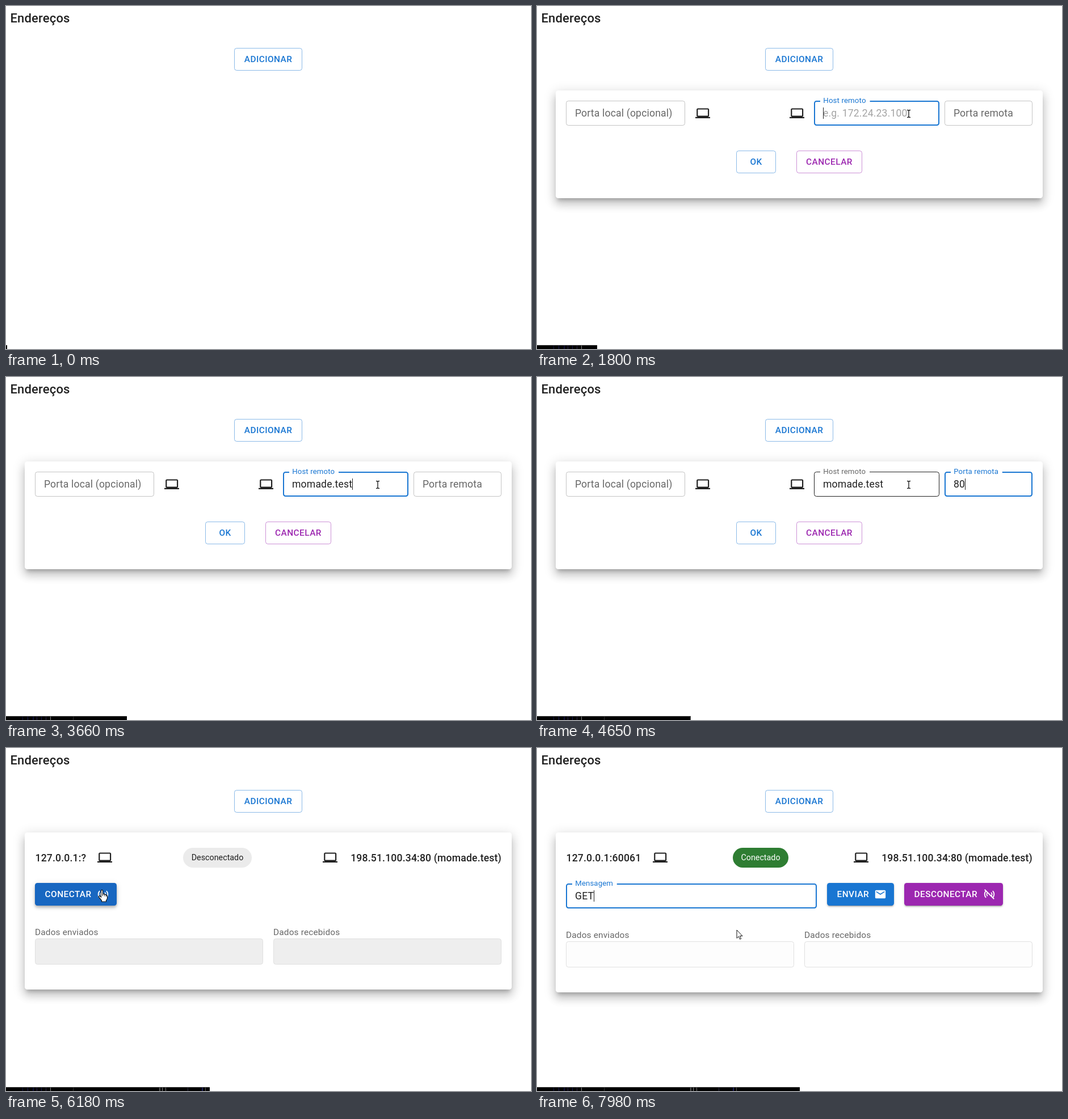
An HTML page that plays this animation: 925 px wide and 605 px high, repeating every 8000 ms.

```html
<!DOCTYPE html>
<html lang="pt">
<head>
<meta charset="utf-8">
<style>
html, body { margin: 0; width: 100%; height: 100%; overflow: hidden; background: #fff; }
#stage { position: relative; width: 925px; height: 605px; overflow: hidden; font-family: Roboto, sans-serif; color: rgba(0,0,0,.87); }
#stage div, #stage svg { position: absolute; box-sizing: border-box; }
.text { white-space: pre; line-height: 24px; font-size: 17.6px; letter-spacing: .00938em; }
.button { border-radius: 4.4px; font: 500 15.4px/40px Roboto, sans-serif; letter-spacing: .02857em; overflow: hidden; white-space: pre; }
.outlined { text-align: center; line-height: 38px; border: 1px solid; }
.label { white-space: pre; background: #fff; padding: 0 9px 0 7px; font-size: 17.6px; line-height: 25.3px; letter-spacing: .00938em; transform-origin: 0 0; }
.caret { display: inline-block; width: 1px; height: 20px; margin-right: -1px; vertical-align: -4px; background: #222; }
</style>
</head>
<body>
<div id="stage"></div>
<script>
const LOOP = 8000, STEP = 30;
const BLUE = '25,118,210', PURPLE = '156,39,176';
const HOST = 'momade.test';

// Moments of the story, in ms
const CLICK_ADD = 270, SHOW_FORM = 330, LEAVE_ADD = 1120, ENTER_CARD = 1245;
const FOCUS_HOST = 1640, FOCUS_PORT = 3900, SUBMIT = 4700;
const CLICK_CONNECT = 5680, CONNECTED = 6450, FOCUS_MESSAGE = 7260, TYPE_MESSAGE = 7500;

const POINTER_PATH = [
  [30, 560, 640], [210, 483, 96], [1000, 483, 96], [1450, 655, 190], [4950, 655, 190],
  [5550, 169, 250], [6470, 169, 250], [6850, 239, 290], [7050, 239, 290],
  [7200, 262, 262], [7350, 262, 262], [7800, 352, 321]
];

const ADD = [402, 74, 120, 40], CONNECT = [51, 238, 144, 40];
const LOCAL_FIELD = [51, 167, 210, 44], HOST_FIELD = [488, 167, 221, 44];
const PORT_FIELD = [718, 167, 155, 44], MESSAGE_FIELD = [51, 239, 442, 44];

const ARCS = '<path fill="none" stroke="#fff" stroke-width="2" d="M5.6 5.6a9 9 0 0 0 0 12.8M18.4 5.6a9 9 0 0 1 0 12.8M8.5 8.5a5 5 0 0 0 0 7M15.5 8.5a5 5 0 0 1 0 7"/>';
const ICONS = {
  laptop: '<path d="M20 18c1.1 0 2-.9 2-2V6c0-1.1-.9-2-2-2H4c-1.1 0-2 .9-2 2v10c0 1.1.9 2 2 2H0v2h24v-2zM4 6h16v10H4z" fill="#212121" fill-rule="evenodd"/>',
  mail: '<path d="M20 4H4c-1.1 0-2 .9-2 2v12c0 1.1.9 2 2 2h16c1.1 0 2-.9 2-2V6c0-1.1-.9-2-2-2zm0 4l-8 5-8-5V6l8 5 8-5z" fill="#fff"/>',
  sensors: ARCS + '<circle cx="12" cy="12" r="2" fill="#fff"/>',
  sensorsOff: ARCS + '<path d="M3 3L21 21" stroke="#fff" stroke-width="2"/>'
};
const CURSORS = {
  arrow: '<path fill="#fff" stroke="#111" d="M0 0V14.5L3.3 11.4 5.4 16.3 7.6 15.4 5.5 10.6H10Z"/>',
  hand: '<path fill="#fff" stroke="#111" stroke-width="1.2" d="M-1.5 1.5Q0-.8 1.5 1.5V8L3 7.5Q4.5 7 4.8 8.5Q7.3 7.8 7.6 9.6Q9.4 9.2 9.5 11.5V15Q9 17.5 7.5 18.5V21H-.5V19L-5 13.5Q-6.5 11-4.5 10.8Q-3 11-1.5 13Z"/><path stroke="#111" d="M1.5 8V11M4.8 8.5V11.5M7.6 9.6V12"/>',
  beam: ['#fff" stroke-width="3', '#111" stroke-width="1.3'].map(s =>
    `<path fill="none" stroke="${s}" d="M-3-6.5Q0-6.5 0-5V5Q0 6.5-3 6.5M3-6.5Q0-6.5 0-5M0 5Q0 6.5 3 6.5"/>`).join('')
};

const ramp = (t, start, length) => Math.min(1, Math.max(0, (t - start) / length));
const mix = (a, b, p) => a + (b - a) * p;
const smooth = p => p * p * (3 - 2 * p);
const easeOut = p => 1 - (1 - p) ** 2.5;
const inside = (p, [x, y, w, h]) => p.x >= x && p.x < x + w && p.y >= y && p.y < y + h;

const box = ([x, y, w, h], css, inner = '', name = '') =>
  `<div class="${name}" style="left:${x}px;top:${y}px;width:${w}px;height:${h}px;${css}">${inner}</div>`;
const text = (x, middle, str, css = '') =>
  `<div class="text" style="left:${x}px;top:${middle - 12}px;${css}">${str}</div>`;
const icon = (name, x, y, size) =>
  `<svg style="left:${x}px;top:${y}px" width="${size}" height="${size}" viewBox="0 0 24 24">${ICONS[name]}</svg>`;
const laptop = (x, y) => icon('laptop', x, y, 26.4);

function shadow(p, layers) {
  return 'box-shadow:' + layers.map(([alpha, from, to]) =>
    from.map((v, i) => mix(v, to[i], p) * 1.1 + 'px').join(' ') + ` rgba(0,0,0,${alpha})`).join() + ';';
}
const cardShadow = p => shadow(p, [
  [.2, [0, 3, 3, -2], [0, 6, 6, -3]], [.14, [0, 3, 4, 0], [0, 10, 14, 1]], [.12, [0, 1, 8, 0], [0, 4, 18, 3]]]);
const buttonShadow = p => shadow(p, [
  [.2, [0, 3, 1, -2], [0, 2, 4, -1]], [.14, [0, 2, 2, 0], [0, 4, 5, 0]], [.12, [0, 1, 5, 0], [0, 1, 10, 0]]]);

function ripple(t, start, x, y, radius, color) {
  if (t < start) return '';
  const r = radius * ramp(t, start, 550);
  const alpha = .3 * (1 - easeOut(ramp(t, start + 100, 550)));
  return box([x - r, y - r, 2 * r, 2 * r], `border-radius:50%;background:rgba(${color},${alpha})`);
}

const outlined = (rect, label, color, hover = 0, extra = '') =>
  box(rect, `color:rgb(${color});border-color:rgba(${color},${mix(.5, 1, hover)});background:rgba(${color},${.04 * hover})`,
    extra + label, 'button outlined');
const contained = (rect, label, iconName, color, hover = 0, extra = '') =>
  box(rect, `color:#fff;padding-left:17.6px;background:rgb(${color});${buttonShadow(hover)}`,
    extra + label + icon(iconName, rect[2] - 35.2, 9, 22), 'button');

const typed = (t, str, start, step) => {
  const count = Math.min(str.length, Math.max(0, Math.floor((t - start) / step) + 1));
  return { value: str.slice(0, count), lastKey: start + (count - 1) * step };
};

function field(t, pointer, rect, label, { focus = Infinity, blur = Infinity, input = { value: '' }, placeholder = '' } = {}) {
  const [x, y, , h] = rect, middle = y + h / 2 + .3;
  const focused = t >= focus && t < blur;
  const p = easeOut(ramp(t, focus, 200)), scale = mix(1, .75, p);
  const border = focused ? `2px solid rgb(${BLUE})` : `1px solid rgba(0,0,0,${inside(pointer, rect) ? .87 : .23})`;
  const { value } = input;
  const blinkStart = value ? input.lastKey : focus;
  const caret = focused && (t - blinkStart) % 1000 < 500 ? '<span class="caret"></span>' : '';
  return box(rect, `border:${border};border-radius:4.4px`) +
    `<div class="label" style="left:${x + 15.9 - 7 * scale}px;top:${y + mix(9.9, -9.9, p)}px;transform:scale(${scale});color:${focused ? `rgb(${BLUE})` : 'rgba(0,0,0,.6)'}">${label}</div>` +
    (t >= focus && !value ? text(x + 16, middle, placeholder, `opacity:${.42 * p}`) : '') +
    text(x + 16, middle, value + caret);
}

function form(t, pointer) {
  return box([33, 149, 858, 190], 'background:#fff;border-radius:4.4px;' + cardShadow(smooth(ramp(t, ENTER_CARD, 300)))) +
    field(t, pointer, LOCAL_FIELD, 'Porta local (opcional)') +
    laptop(279, 176) + laptop(444.5, 176) +
    field(t, pointer, HOST_FIELD, 'Host remoto',
      { focus: FOCUS_HOST, blur: FOCUS_PORT, input: typed(t, HOST, 2400, 115), placeholder: 'e.g. 172.24.23.100' }) +
    field(t, pointer, PORT_FIELD, 'Porta remota',
      { focus: FOCUS_PORT, input: typed(t, '80', 4290, 150), placeholder: 'e.g. 80' }) +
    outlined([351, 255, 70, 40], 'OK', BLUE) + outlined([457, 255, 116, 40], 'CANCELAR', PURPLE);
}

const chip = (x, width, label, css) =>
  box([x, 176, width, 35], `border-radius:18px;text-align:center;font-size:14.3px;line-height:34px;${css}`, label);

function dataBox(x, y, label, background) {
  return text(x, y - 11, label, 'font-size:15.4px;letter-spacing:.0107em;color:rgba(0,0,0,.6)') +
    box([x, y, 402, 46], `border:1px solid #e0e0e0;border-radius:4.4px;background:${background}`);
}

function session(t, pointer) {
  const on = t >= CONNECTED, dataTop = on ? 341 : 336, fill = on ? '#fdfdfd' : '#eee';
  let html = box([33, 149, 858, on ? 282 : 277], 'background:#fff;border-radius:4.4px;' + cardShadow(1)) +
    text(51.5, 194, '127.0.0.1:' + (on ? '60061' : '?'), 'font-weight:500') +
    laptop(on ? 203.5 : 161, 180) + laptop(557.5, 180) +
    text('auto;right:52', 194, `198.51.100.34:80 (${HOST})`, 'font-weight:500') +
    dataBox(51, dataTop, 'Dados enviados', fill) + dataBox(471, dataTop, 'Dados recebidos', fill);
  if (!on) {
    const hover = smooth(ramp(t, 5440, 250));
    const color = [mix(25, 21, hover), mix(118, 101, hover), mix(210, 192, hover)].join();
    return html + chip(312, 121, 'Desconectado', 'background:#ebebeb') +
      contained(CONNECT, 'CONECTAR', 'sensors', color, hover, ripple(t, CLICK_CONNECT, 116, 12, 125, '255,255,255'));
  }
  const p = smooth(ramp(t, CONNECTED, 250));
  const leaveColor = [mix(25, 156, p), mix(118, 39, p), mix(210, 176, p)].join();
  const input = typed(t, 'GET', TYPE_MESSAGE, 200);
  html += chip(345, 98, 'Conectado', 'background:#2e7d32;color:#fff') +
    field(t, pointer, MESSAGE_FIELD, 'Mensagem', { focus: FOCUS_MESSAGE, input }) +
    contained([511, 238, 118, 40], 'ENVIAR', 'mail', BLUE) +
    contained([647, 238, 174, 40], 'DESCONECTAR', 'sensorsOff', leaveColor);
  if (!input.value) {
    for (const [x, base] of [[425, '10'], [458, '16']])
      html += text(x, 261, base, 'font-size:15.4px;color:#9e9e9e');
  }
  return html;
}

function pointerAt(t) {
  let i = 0;
  while (i < POINTER_PATH.length - 2 && t >= POINTER_PATH[i + 1][0]) i++;
  const [t0, x0, y0] = POINTER_PATH[i], [t1, x1, y1] = POINTER_PATH[i + 1];
  const p = smooth(ramp(t, t0, t1 - t0));
  return { x: mix(x0, x1, p), y: mix(y0, y1, p) };
}

function cursor(t, pointer) {
  const isForm = t >= SHOW_FORM && t < SUBMIT, on = t >= CONNECTED;
  const buttons = [ADD], texts = [];
  if (isForm) texts.push(LOCAL_FIELD, HOST_FIELD, PORT_FIELD);
  else if (on) texts.push(MESSAGE_FIELD);
  else if (t >= SUBMIT) { buttons.push(CONNECT); texts.push([602, 182, 271, 24]); }
  const over = list => list.some(rect => inside(pointer, rect));
  const shape = over(buttons) ? 'hand' : over(texts) ? 'beam' : 'arrow';
  return `<svg style="left:${pointer.x}px;top:${pointer.y}px;overflow:visible" width="1" height="1">${CURSORS[shape]}</svg>`;
}

// Dark timeline strip with thin coloured streaks
const STREAKS = [[29, 1, '#151545'], [38, 1, '#22225c'], [47, 2, '#101038'], [54, 1, '#2a2050'], [62, 1, '#181850'],
  [70, 1, '#302848'], [78, 1, '#888'], [118, 1, '#333'], [270, 2, '#555'], [275, 1, '#888'], [281, 1, '#777'],
  [320, 1, '#33334d'], [345, 2, '#20205a'], [351, 1, '#555']]
  .map(([x, w, color]) => box([x, 0, w, 7], 'background:' + color)).join('');
const strip = t => box([0, 598, 2 + t * .05777, 7], 'background:#000;border-top:1px solid #444;overflow:hidden', STREAKS);

function scene(t) {
  const pointer = pointerAt(t);
  const addHover = smooth(ramp(t, 190, 250)) * (1 - smooth(ramp(t, LEAVE_ADD, 250)));
  return text(7.5, 21.5, 'Endereços', 'font-size:22px;font-weight:500;letter-spacing:.0075em') +
    outlined(ADD, 'ADICIONAR', BLUE, addHover, ripple(t, CLICK_ADD, 80, 21, 95, BLUE)) +
    (t >= SUBMIT ? session(t, pointer) : t >= SHOW_FORM ? form(t, pointer) : '') +
    strip(t) + cursor(t, pointer);
}

const stage = document.getElementById('stage');
let shown = -1;
function draw() {
  const t = Math.floor(performance.now() % LOOP / STEP) * STEP;
  if (t !== shown) stage.innerHTML = scene(shown = t);
  requestAnimationFrame(draw);
}
draw();
</script>
</body>
</html>
```
